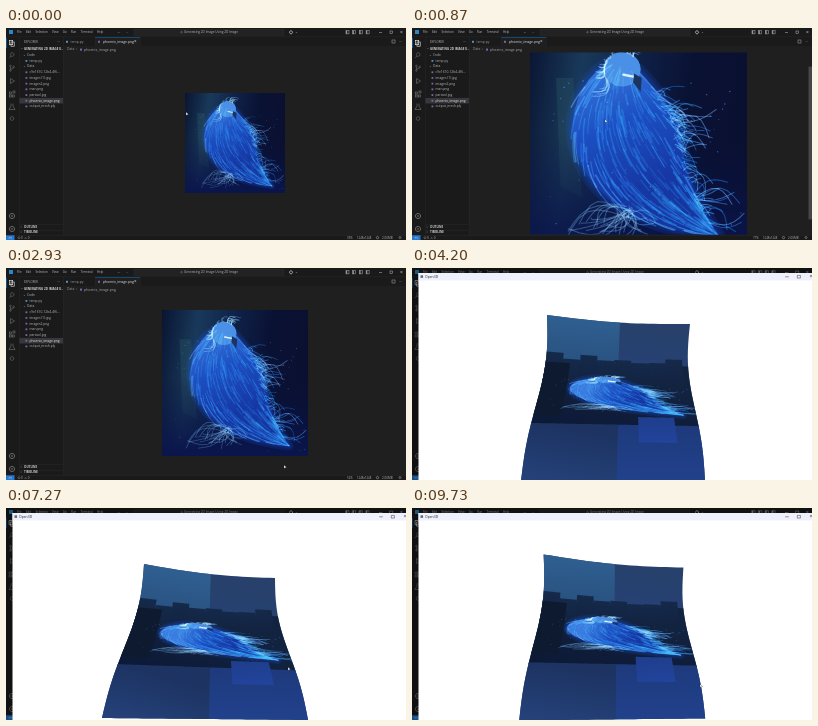
Write an HTML page with a canvas that moves like this. It is 400 px wide and 212 px high and loops after 9.8 s.

```html
<!DOCTYPE html>
<html lang="en">
<head>
<meta charset="utf-8">
<title>Image to mesh</title>
<style>
html, body { margin: 0; width: 100%; height: 100%; overflow: hidden; background: #181818; }
canvas { display: block; width: 100vw; height: 100vh; }
</style>
</head>
<body>
<canvas id="stage"></canvas>
<script>
const LOOP = 9800, WINDOW_OPENS = 4070, VIEW_HEIGHT = 182;
const canvas = document.getElementById('stage');
const c = canvas.getContext('2d');
const { sin, cos, PI } = Math;
const mix = (a, b, k) => a + (b - a) * k;
const range = (n, f) => Array.from({ length: n }, (_, i) => f(i));

// Eased values of a track with keys [time, ...values]
function track(keys, t) {
  const next = keys.findIndex(key => key[0] > t);
  if (next < 1) return keys.at(next).slice(1);
  const a = keys[next - 1], b = keys[next], k = (t - a[0]) / (b[0] - a[0]);
  return a.map((v, i) => mix(v, b[i], k * k * (3 - 2 * k))).slice(1);
}

function random(seed) {
  return () => (seed = (seed * 16807) % 2147483647) / 2147483647;
}

function box(x, y, w, h, color) {
  c.fillStyle = color;
  c.fillRect(x, y, w, h);
}

function text(s, x, y, size = 3.4, color = '#b4b4b4', weight = 400, align = 'left') {
  c.font = `${weight} ${size}px "Open Sans", sans-serif`;
  c.textAlign = align;
  c.textBaseline = 'middle';
  c.fillStyle = color;
  c.fillText(s, x, y);
}

function trace(points) {
  c.beginPath();
  points.forEach(p => c.lineTo(...p));
}

function line(points, color, width = 0.5) {
  trace(points);
  c.strokeStyle = color;
  c.lineWidth = width;
  c.stroke();
}

function shape(points, color) {
  trace(points);
  c.fillStyle = color;
  c.fill();
}

function ring(x, y, r, color, width = 0.5) {
  line(range(17, i => [x + r * cos(i * PI / 8), y + r * sin(i * PI / 8)]), color, width);
}

function frame(x, y, w, h, color, width = 0.5) {
  c.strokeStyle = color;
  c.lineWidth = width;
  c.strokeRect(x, y, w, h);
}

function shade(from, to, ...colors) {
  const fill = c.createLinearGradient(...from, ...to);
  colors.forEach((color, i) => fill.addColorStop(i / (colors.length - 1), color));
  return fill;
}

// Point on the bird: s runs from head to tail, q from breast (-1) to back (1)
function onBody(s, q) {
  const r = 1 - s;
  const x = r * r * .43 + 2 * r * s * .33 + s * s * .87, y = r * r * .15 + 2 * r * s * .6 + s * s * .93;
  const dx = -.1 * r + .54 * s, dy = .45 * r + .33 * s;
  const w = (.07 * r + .2 * sin(PI * s ** .8)) * q / Math.hypot(dx, dy);
  return [x + dy * w, y - dx * w];
}

// The bird in unit coordinates, placed by map(u, v)
function bird(map, unit) {
  const rnd = random(77);
  const body = (s, q) => map(...onBody(s, q));
  const wisp = (u, v, du, dv, bend, color, w = unit) => line(range(7, i => {
    const k = i / 6, b = bend * sin(PI * k);
    return map(u + du * k - dv * b * 2, v + dv * k + du * b * 2);
  }), color, w);
  const outline = [...range(25, i => body(i / 24, -1)), ...range(25, i => body(1 - i / 24, 1))];
  c.lineJoin = c.lineCap = 'round';
  for (const w of [12, 7, 3]) line(outline, 'rgba(30,85,215,.16)', unit * w);
  shape(outline, shade(map(.35, .1), map(.7, .95), '#3a7ce0', '#1c4fc2', '#1638a4', '#15369c'));
  shape(range(24, i => map(.425 + .085 * cos(i * PI / 12), .16 + .08 * sin(i * PI / 12))), '#4a90e6');

  c.globalCompositeOperation = 'screen';
  for (let i = 0; i < 300; i++) {
    const s = rnd() * .92, q = rnd() * 2 - 1, length = .05 + .09 * rnd();
    const light = 26 + 26 * q * q + 16 * rnd() * (1 - s / 2);
    line(range(5, j => body(Math.min(1, s + length * j / 4), q * (1 + .03 * j))),
      `hsla(${210 + 14 * rnd()},85%,${light}%,.5)`, unit * (.5 + rnd()));
  }
  for (let i = 0; i < 90; i++) {
    const [u, v] = onBody(.1 + .85 * rnd(), .85 + .2 * rnd());
    const angle = -.5 + 1.6 * rnd(), reach = .04 + .16 * rnd() ** 2;
    wisp(u, v, reach * cos(angle), reach * sin(angle), .3 * rnd() - .2,
      `hsla(${208 + 12 * rnd()},90%,${45 + 25 * rnd()}%,.55)`, unit * .8);
  }
  for (let i = 0; i < 50; i++) {
    const a = PI * (.75 + rnd()), reach = .02 + .05 * rnd();
    wisp(.42 + .08 * cos(a), .16 + .08 * sin(a), reach * cos(a + .5), reach * sin(a - .6) + .02, -.2,
      'rgba(120,190,250,.5)', unit * .8);
  }
  for (let i = 0; i < 34; i++) {
    wisp(.4 + .08 * rnd(), .79 + .05 * rnd(), -.28 + .42 * rnd(), .02 + .11 * rnd(), .4 * rnd() - .2,
      'rgba(85,140,195,.45)', unit * .9);
  }
  for (let i = 0; i < 50; i++) {
    const [x, y] = map(.08 + rnd() * .9, .15 + rnd() * .82);
    box(x, y, unit, unit, `rgba(60,125,245,${.2 + rnd() * .6})`);
  }
  c.globalCompositeOperation = 'source-over';
  wisp(.43, .185, .05, .01, 0, '#d9f2ff', unit * 2);
  shape([map(.48, .18), map(.515, .2), map(.51, .265), map(.475, .22)], '#1c3560');
}

function photo(size, cx, cy) {
  const x = cx - size / 2, y = cy - size / 2;
  const map = (u, v) => [x + u * size, y + v * size];
  c.save();
  c.beginPath();
  c.rect(57, 24.5, 343, VIEW_HEIGHT);
  c.clip();
  c.beginPath();
  c.rect(x, y, size, size);
  c.clip();
  box(x, y, size, size, shade(map(0, 0), map(1, .15), '#0a1432', '#19395a', '#0f2148', '#0a1234', '#0a1030'));
  shape([map(.12, .2), map(.2, .2), map(.24, .75), map(.14, .7)], 'rgba(38,78,96,.45)');
  box(x, y, size, size, shade(map(0, .45), map(0, 1), 'rgba(9,18,64,0)', '#0a154c'));
  bird(map, size * .0055);
  c.restore();
}

const FILES = ['Code', 'temp.py', 'Data', 'c9e1610-12b4-4f6…', 'images (1).jpg', 'images2.png',
  'man.png', 'parasol.jpg', 'phoenix_image.png', 'output_mesh.ply'];
const MENU = ['File', 'Edit', 'Selection', 'View', 'Go', 'Run', 'Terminal', 'Help'];

function activityBar() {
  const dim = '#858585';
  box(0, 10, .6, 10, '#0078d4');
  for (const d of [0, 1.5]) frame(3.5 + d, 12.5 + d, 3.2, 4.2, '#eee', .6);
  ring(6.2, 26.5, 1.8, dim);
  line([[5, 28], [3.3, 29.8]], dim);
  for (const [x, y] of [[4.4, 38], [4.4, 42.5], [7.6, 39]]) ring(x, y, .8, dim);
  line([[4.4, 39], [4.4, 41.5], [7.4, 40]], dim);
  line([[4.5, 50.5], [8.5, 53], [4.5, 55.5], [4.5, 50.5]], dim);
  for (const [x, y] of [[3.5, 64], [3.5, 67], [6.5, 67], [7, 63]]) frame(x, y, 2, 2, dim);
  line([[5, 75.5], [5, 78], [3, 81.5], [9, 81.5], [7, 78], [7, 75.5]], dim);
  ring(6, 90.5, 1.8, dim);
  for (const y of [188, 201]) {
    ring(6, y, 2.6, dim, .7);
    ring(6, y, .8, dim);
  }
}

function titleBar() {
  box(3, 2, 4, 4, '#2489ca');
  let x = 11;
  for (const item of MENU) {
    text(item, x, 4.4, 2.9, '#c0c0c0');
    x += c.measureText(item).width + 4.4;
  }
  text('←', 111, 4.3, 4);
  text('→', 119, 4.3, 4, '#777');
  box(128, 1.4, 150, 6, '#222');
  frame(128, 1.4, 150, 6, '#383838', .3);
  ring(175.5, 4.2, .8, '#aaa', .4);
  text('Generating 2D Image Using 2D Image', 205, 4.4, 3.1, '#b4b4b4', 400, 'center');
  ring(285, 4.3, 1.5, '#ccc', .8);
  text('⌄', 289, 4, 3.5);
  for (let i = 0; i < 4; i++) {
    frame(340 + i * 6.7, 2.7, 3, 3.2, '#bbb', .45);
    box(340 + i * 6.7, 2.7, 1.2, 3.2, '#999');
  }
  line([[373, 4.5], [376, 4.5]], '#bbb');
  frame(384, 3, 2.7, 2.7, '#bbb');
  text('×', 394, 4.3, 5, '#ccc');
}

function sidebar() {
  text('EXPLORER', 18, 13.8, 2.9);
  text('···', 51, 13.5, 4);
  c.save();
  c.beginPath();
  c.rect(13, 18, 44, 189);
  c.clip();
  text('⌄', 14.5, 20.5);
  text('GENERATING 2D IMAGE U…', 18, 21.2, 3, '#d0d0d0', 700);
  FILES.forEach((name, i) => {
    const y = 27.2 + i * 5.69, isFile = name.includes('.') || name.includes('…');
    const selected = name.startsWith('phoenix');
    if (selected) box(13.4, y - 2.8, 43.6, 5.6, '#37373d');
    if (isFile) box(19.5, y - .9, 1.8, 1.8, name.endsWith('.py') ? '#4c91c9' : '#8064a4');
    else text('⌄', 17, y - .5);
    text(name, isFile ? 23.5 : 21, y, 3.3, selected ? '#e4e4e4' : '#b4b4b4');
  });
  ['OUTLINE', 'TIMELINE'].forEach((name, i) => {
    text('›', 14.5, 198.8 + i * 5.5, 4);
    text(name, 18, 199.2 + i * 5.5, 3, '#ccc', 700);
  });
  c.restore();
}

function editor(size) {
  const scrolls = size > VIEW_HEIGHT;
  box(0, 0, 400, 212, '#1a1a1a');
  box(57, 18, 343, 189, '#1f1f1f');
  box(89, 9, 45, 9, '#1f1f1f');
  box(89, 9, 45, .5, '#0078d4');
  for (const x of [13, 57]) box(x, 9, .4, 198, '#2c2c2c');
  for (const x of [89, 134]) box(x, 9, .4, 9, '#2c2c2c');
  for (const y of [8.7, 207]) box(0, y, 400, .4, '#2c2c2c');
  for (const y of [196, 202]) box(13, y, 44, .4, '#2c2c2c');
  titleBar();
  activityBar();
  sidebar();

  box(60, 12.8, 2, 2, '#4c91c9');
  text('temp.py', 64.5, 13.8, 3.4, '#999');
  box(92, 12.8, 2, 2, '#8064a4');
  text('phoenix_image.png', 97, 13.8, 3.4, '#e4e4e4');
  text('×', 128, 13.8, 4.5, '#ddd');
  frame(386, 12, 3, 3, '#aaa');
  text('···', 393, 13.5, 4);
  text('Data  ›', 61, 21.6, 3.4, '#999');
  box(74, 20.6, 2, 2, '#8064a4');
  text('phoenix_image.png', 78, 21.6, 3.5, '#a4a4a4');

  photo(size, scrolls ? 226.5 : 229, 115);
  if (scrolls) {
    const thumb = VIEW_HEIGHT ** 2 / size;
    box(396.5, 115 - thumb / 2, 3.5, thumb, '#474747');
  }

  box(0, 207.3, 8.5, 5, '#2678cf');
  text('><', 2.5, 209.7, 3.2, '#fff');
  ring(13, 209.7, 1, '#bbb', .4);
  text('0  ⚠ 0', 15, 209.8, 3);
  text(Math.round(size / 2.82) + '%', 341, 209.8, 2.9);
  text('1248x1248', 351, 209.8, 2.8);
  ring(371.5, 209.6, 1.2, '#bbb');
  text('2.00MB', 376, 209.8, 3);
  ring(394, 209.5, 1, '#bbb');
}

// Corners of the sheet: top left, top right, bottom left, bottom right
const FACING = [[135, 47], [278, 56], [109, 213], [293, 213]];
const TILTED = [[138, 56], [269, 70], [96, 210], [302, 212]];
const TURNED = [[130, 44], [272, 57], [110, 213], [291, 210]];
const TILT = [[5900, 0], [7000, .72], [7500, 1.22], [8330, 0], [8900, -.33], [9730, .2]];
const TURN = [[7400, 0], [8330, 1]];

function surface(t) {
  const [tilt] = track(TILT, t), [turn] = track(TURN, t);
  const [tl, tr, bl, br] = FACING.map((p, i) =>
    p.map((a, k) => mix(mix(a, TURNED[i][k], turn), TILTED[i][k], tilt)));
  return (u, v) => {
    const pinch = 4 * sin(PI * v) + 3 * sin(2 * PI * v);
    const left = mix(tl[0], bl[0], v) + pinch, right = mix(tr[0], br[0], v) - pinch;
    const sag = 3 * sin(PI * u) * (1 - v) ** 3;
    return [mix(left, right, u), mix(mix(tl[1], tr[1], u), mix(bl[1], br[1], u), v) + sag];
  };
}

function patch(map, u0, v0, u1, v1, top, bottom = top) {
  const side = f => range(25, i => f(i / 24));
  shape([
    ...side(k => map(mix(u0, u1, k), v0)), ...side(k => map(u1, mix(v0, v1, k))),
    ...side(k => map(mix(u1, u0, k), v1)), ...side(k => map(u0, mix(v1, v0, k)))
  ], shade(map(u0, v0), map(u0, v1), top, bottom));
}

function mesh(t) {
  const map = surface(t), rnd = random(12);
  patch(map, 0, 0, 1, 1, '#27416c', '#21418c');
  patch(map, 0, 0, .51, .4, '#2f5f91', '#264c78');
  patch(map, 0, .27, 1, .66, '#122340', '#0c1836');
  for (let u = 0; u < .95; u += .12) patch(map, u, .22 + .06 * rnd(), u + .12, .4, '#15294a', '#122340');
  patch(map, 0, .28, .17, .6, '#0d1a30');
  patch(map, 0, .65, .52, 1, '#1d3463', '#25427a');
  patch(map, .52, .65, 1, 1, '#1e3a7c', '#21418c');
  patch(map, .64, .6, .86, .76, '#1f3d8c', '#21439a');
  bird((u, v) => map(u * 1.08 - .02, .315 + .25 * v + .04 * u), .65);
}

function viewer(t) {
  box(0, 0, 400, 212, 'rgba(0,0,0,.35)');
  box(6.5, 5, 394, 207, '#fff');
  box(6.5, 5, 394, 7.5, '#eef1fb');
  box(8.5, 7.3, 2.6, 2.6, '#5b6b7c');
  text('Open3D', 13, 8.8, 3.4, '#222');
  line([[373.5, 8.8], [376.5, 8.8]], '#333');
  frame(385.7, 7.4, 2.7, 2.7, '#333');
  text('×', 397.5, 8.7, 5, '#333');
  mesh(t);
}

function cursor(x, y) {
  const arrow = [[x, y], [x, y + 3.6], [x + 1, y + 2.8], [x + 2.6, y + 2.5], [x, y]];
  shape(arrow, '#fff');
  line(arrow, '#111', .3);
}

const ZOOM = [[60, 100], [870, 217], [1800, 217], [2700, 146]];
const POINTER = [[100, 180, 84], [2000, 216, 104], [2930, 278, 197], [4100, 278, 197],
  [5900, 278, 140], [7270, 282, 159], [8330, 285, 181], [9730, 288, 176]];

function draw(now) {
  const t = now % LOOP, ratio = window.devicePixelRatio || 1;
  const w = Math.round(innerWidth * ratio), h = Math.round(innerHeight * ratio);
  if (canvas.width !== w || canvas.height !== h) {
    canvas.width = w;
    canvas.height = h;
  }
  c.setTransform(w / 400, 0, 0, h / 212, 0, 0);
  editor(...track(ZOOM, t));
  if (t >= WINDOW_OPENS) viewer(t);
  if (t < WINDOW_OPENS || t > 5900) cursor(...track(POINTER, t));
}

const start = performance.now();
function tick() {
  draw(performance.now() - start);
  requestAnimationFrame(tick);
}
tick();
</script>
</body>
</html>
```
